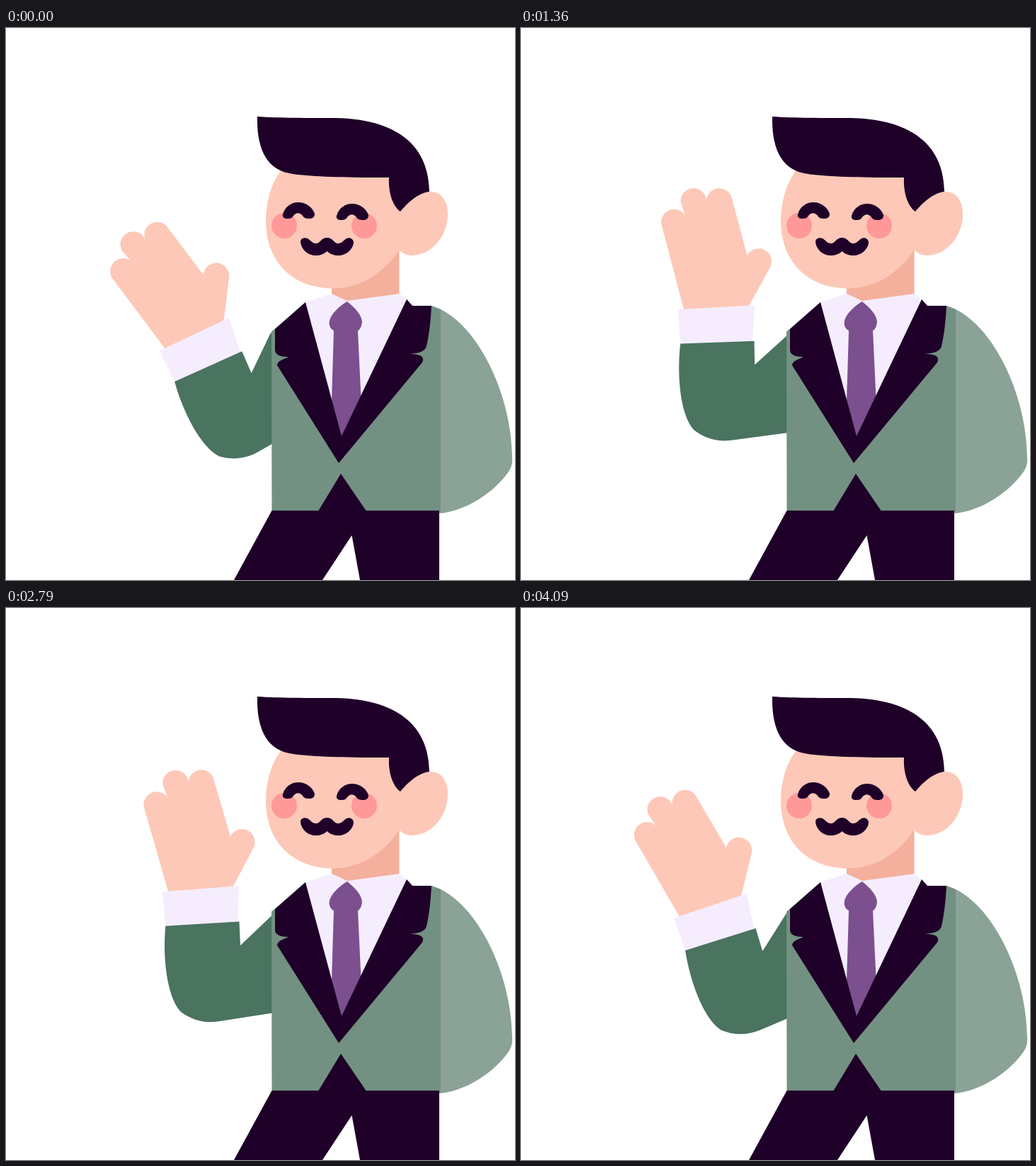
Recreate the animation shown at these times as an HTML page with a canvas. Size 719 by 779 pixels, loop 4.12 s.

```html
<!DOCTYPE html>
<html lang="en">
<head>
<meta charset="utf-8">
<title>Waving man</title>
<style>
html, body { margin: 0; width: 100%; height: 100%; overflow: hidden; background: #fff; }
canvas { display: block; }
</style>
</head>
<body>
<canvas id="stage" width="719" height="779"></canvas>
<script>
const ctx = document.getElementById('stage').getContext('2d');

const LOOP = 4120;
const STEP = 1000 / 30;
const SHOULDER = [368.5, 439];

const INK = '#1f0029';
const SKIN = '#fdc8b7';
const SHADE = '#f4b09c';
const BLUSH = '#ff9999';
const LINEN = '#f5edfe';
const SLEEVE = '#4a7360';
const JACKET = '#739182';
const FAR_SLEEVE = '#8aa396';
const TIE = '#7c4f8f';

const shape = (color, d) => ({ color, path: new Path2D(d) });
const cheek = (x, y) => shape(BLUSH, `M${x - 18} ${y} a18 18 0 1 1 36 0 a18 18 0 1 1 -36 0 Z`);
const eye = (x, y) => shape(INK, `M${x} ${y} c3 -11 12 -17 22 -17 c11 0 20 7 23 16` +
  'c0 5 -3 7 -7 7 c-6 0 -8 -1 -10 -4 c-4 -5 -9 -5 -13 0 c-2 3 -4 4 -8 4 c-5 0 -8 -2 -7 -6 Z');

const arm = [
  shape(SKIN, 'M230 402 L196.5 283 A18.2 18.2 0 0 1 229 267 L222.3 248' +
    'A18.2 18.2 0 1 1 258.7 245 A18.2 18.2 0 0 1 294.5 241.5 L317.5 322' +
    'A18.2 18.2 0 0 1 350.3 338 L320 395 Z'),
  shape(LINEN, 'M221 399.7 L329.5 391.8 L327 446 L225.5 452 Z'),
  shape(SLEEVE, 'M225.3 448 L329.5 442.3 L330.8 476 L377 432.5 L420 565 L300 583' +
    'C280 586 262 581 246 569 C226 547 221 490 225.3 448 Z')
];

const body = [
  shape(FAR_SLEEVE, 'M601 392 L614 397 C670 425 714 520 715 605 C716 615 713 622 710 626' +
    'C690 655 650 682 612 685 Z'),
  shape(SHADE, 'M460 355 L555.5 305 L555.5 377 L482 387 L460 377 Z'),
  shape(JACKET, 'M375 428.5 L423 387 L474 577 L566 383 L574 392 L601 392 L614 397' +
    'L614 684 L612 681 L375.5 681 Z'),
  shape(LINEN, 'M423 387 L460 375 L482 385 L556 375 L566 384 L474 580 Z'),
  shape(TIE, 'M482 386 C492 394 503 405 503 415 C502 424 498 427 497 427 L501.5 522 L474 582' +
    'L460 526 L463 427 C457 424 456 418 457 413 C459 404 471 392 482 386 Z'),
  shape(INK, 'M423 387 L380 425 L380 455 C381 463 390 464 399 464 C391 468 383 470 383 476' +
    'L470 614 L588 472 C592 464 586 460 570 460 C582 459 592 457 594 449' +
    'C598 432 600 412 601 392 L574 392 L566 383 L474 576 Z'),
  shape(INK, 'M473 629 L508.5 681 L612 681 L612 779 L500 779 L488.5 716 L447 779' +
    'L322 779 L375.5 681 L441.5 681 Z')
];

const head = [
  shape(SKIN, 'M400 190 C374 210 367 248 367 272 C367 330 405 367.5 462 367.5' +
    'C505 367 537 342 556 312 L560 200 Z'),
  shape(SKIN, 'M554 260 C570 243 584 232 600 231 C616 231 625 246 624 266' +
    'C622 296 600 321 573 321 C566 321 558 317 554 312 Z'),
  shape(INK, 'M355 125 C385 127 430 127 460 127 C528 127 597 149 598 231' +
    'C582 233 567 247 557 259 C545 250 540 230 541 211 L510 211' +
    'C460 210.5 420 209 400 205 C365 198 354 165 355 125 Z'),
  cheek(393, 279),
  cheek(506, 279),
  eye(391, 263),
  eye(467, 265),
  // moustache
  shape(INK, 'M416 302 C416 297 421 295 426 297 C430 299 432 304 438 304' +
    'C444 304 445 296 453.5 296 C462 296 463 304 469 304 C475 304 477 299 481 297' +
    'C486 295 491 298 491 303 C490 313 480 321 470 321 C463 321 458 319 453.5 315' +
    'C449 319 444 321 437 321 C427 321 417 313 416 302 Z')
];

function draw(parts) {
  for (const { color, path } of parts) {
    ctx.fillStyle = color;
    ctx.fill(path);
  }
}

const ease = s => s * s * s * (10 + s * (6 * s - 15));

// Arm angle in degrees: an eased swing back and forth
function waveAngle(tick) {
  const half = 9.145, low = 16.65, period = 2 * half;
  const p = (((tick - low) % period) + period) % period;
  return -22.4 + 29.8 * ease(Math.min(p, period - p) / half);
}

function render(ms) {
  // the swing advances in 30 steps per second
  const tick = Math.floor((ms % LOOP + 12) / STEP);
  ctx.fillStyle = '#fff';
  ctx.fillRect(0, 0, 719, 779);

  ctx.save();
  ctx.translate(...SHOULDER);
  ctx.rotate(waveAngle(tick) * Math.PI / 180);
  ctx.translate(-SHOULDER[0], -SHOULDER[1]);
  draw(arm);
  ctx.restore();

  draw(body);
  draw(head);
}

let start;
function loop(now) {
  start ??= now;
  render(now - start);
  requestAnimationFrame(loop);
}
render(0);
requestAnimationFrame(loop);
</script>
</body>
</html>
```
